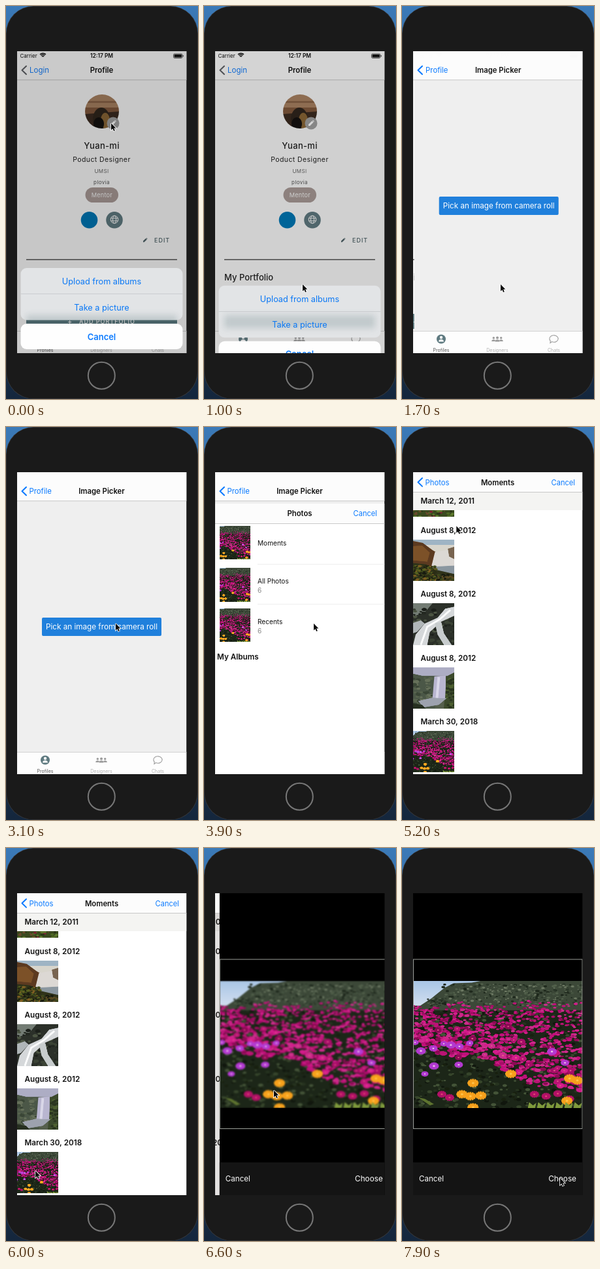
An HTML page with a canvas that plays this animation: 294 px wide and 600 px high, repeating every 8000 ms.

```html
<!DOCTYPE html>
<html lang="en">
<head>
<meta charset="utf-8">
<title>Profile photo picker</title>
<style>
html, body { margin: 0; width: 100%; height: 100%; overflow: hidden; background: #1a1a1a; }
canvas { display: block; width: 294px; height: 600px; }
</style>
</head>
<body>
<canvas id="stage"></canvas>
<script>
const W = 294, H = 600, LOOP = 8000;
const SX = 17, SY = 69, SW = 259.5, SH = 461, MID = 146.5;
const BLUE = '#0a7aff', TEAL = '#5f7a80';
const canvas = document.getElementById('stage');
const dpr = window.devicePixelRatio || 1;
canvas.width = W * dpr;
canvas.height = H * dpr;
const c = canvas.getContext('2d');

const lerp = (a, b, p) => a + (b - a) * p;
const ease = (t, start, len) => {
  const u = Math.min(1, Math.max(0, (t - start) / len));
  return u * u * (3 - 2 * u);
};
function seeded(s) {
  return () => (s = (s * 16807) % 2147483647) / 2147483647;
}

// ---- drawing helpers
function box(x, y, w, h, color, r = 0, g = c) {
  g.fillStyle = color;
  g.beginPath();
  g.roundRect(x, y, w, h, r);
  g.fill();
}
function oval(x, y, rx, ry, color, g = c) {
  g.fillStyle = color;
  g.beginPath();
  g.ellipse(x, y, rx, ry, 0, 0, 7);
  g.fill();
}
function poly(points, color, g = c) {
  g.fillStyle = color;
  g.beginPath();
  for (let i = 0; i < points.length; i += 2) g.lineTo(points[i], points[i + 1]);
  g.closePath();
  g.fill();
}
function stroke(points, color, width, g = c) {
  g.strokeStyle = color;
  g.lineWidth = width;
  g.beginPath();
  for (let i = 0; i < points.length; i += 2) g.lineTo(points[i], points[i + 1]);
  g.stroke();
}
function text(s, x, y, size, color, weight = 400, align = 'left', gap = 0) {
  c.font = `${weight} ${size}px Inter, "Open Sans", sans-serif`;
  c.letterSpacing = gap + 'px';
  c.textAlign = align;
  c.fillStyle = color;
  c.fillText(s, x, y);
}
function layer(fn, alpha = 1, dx = 0, dy = 0) {
  c.save();
  c.globalAlpha *= alpha;
  c.translate(dx, dy);
  fn();
  c.restore();
}

// ---- pictures
function picture(w, h, paint) {
  const p = document.createElement('canvas');
  p.width = w * 2;
  p.height = h * 2;
  const g = p.getContext('2d');
  g.scale(2, 2);
  paint(g);
  return p;
}
function dabs(g, n, seed, area, colors, size) {
  const rnd = seeded(seed), [x, y, w, h] = area;
  for (let i = 0; i < n; i++) {
    const r = size * (0.5 + rnd());
    oval(x + rnd() * w, y + rnd() * h, r, r * 0.6, colors[Math.floor(rnd() * colors.length)], g);
  }
}
function bloom(g, x, y, r, color, core) {
  for (let i = 0; i < 12; i++) {
    const a = i * Math.PI / 6;
    stroke([x, y, x + Math.cos(a) * r, y + Math.sin(a) * r * 0.75], color, r * 0.36, g);
  }
  oval(x, y, r * 0.22, r * 0.18, core, g);
}

const GREENS = ['#26331f', '#18200f', '#36452b', '#445438', '#11170e'];
const PINKS = ['#c0107a', '#a80d69', '#d41c8c', '#8d0a55', '#b91474', '#cc2b8b'];

const flowers = picture(260, 194, g => {
  box(0, 0, 260, 194, '#1c2618', 0, g);
  const sky = g.createLinearGradient(0, 0, 0, 40);
  sky.addColorStop(0, '#a9c6e6');
  sky.addColorStop(1, '#d3dff0');
  box(0, 0, 260, 38, sky, 0, g);
  poly([8, 40, 28, 27, 48, 11, 62, 4, 90, 3, 106, 0, 260, 0, 260, 45, 0, 45], '#3c4838', g);
  dabs(g, 420, 5, [46, 5, 216, 34], ['#2c382a', '#52604b', '#6c7862', '#1e281c', '#465441'], 1.9);
  dabs(g, 60, 6, [22, 27, 30, 12], ['#2c382a', '#52604b', '#1e281c'], 1.8);
  dabs(g, 650, 11, [0, 44, 260, 150], GREENS, 2.8);
  const rnd = seeded(77);
  for (let i = 0; i < 1150; i++) {
    const x = rnd() * 262, v = rnd();
    const top = 37 + 5 * Math.sin(x / 17) - x * 0.025;
    const low = 90 + x * 0.34 + 8 * Math.sin(x / 23);
    const y = lerp(top, low, v);
    if (Math.sin(x * 0.07 + y * 0.23) + Math.sin(y * 0.34 - x * 0.045) > 1.25) continue;
    const r = 1.6 + v * 3 * rnd() + rnd() * 1.6;
    oval(x, y, r, r * 0.55, PINKS[Math.floor(rnd() * 6)], g);
  }
  for (let i = 0; i < 38; i++) {
    const x = rnd() * 260, y = 65 + rnd() * (35 + x * 0.27);
    bloom(g, x, y, 4 + rnd() * 3, PINKS[Math.floor(rnd() * 6)], '#e05a86');
  }
  [44, 173, 56, 178, 186, 173, 204, 176, 222, 172, 240, 180].forEach((v, i, a) => {
    if (i % 2 === 0) bloom(g, v, a[i + 1], 7, '#b31167', '#dc4a70');
  });
  [3, 94, 12, 107, 31, 103, 47, 96, 58, 98, 71, 100, 87, 95, 32, 130, 70, 128, 18, 142, 213, 108, 233, 125]
    .forEach((v, i, a) => {
      if (i % 2 === 0) bloom(g, v, a[i + 1], 5.5 + i % 3, '#b43ad2', '#e9c0e6');
    });
  [92, 156, 75, 173, 88, 176, 104, 175, 150, 142, 240, 149, 252, 152, 236, 183, 92, 193]
    .forEach((v, i, a) => {
      if (i % 2 === 0) bloom(g, v, a[i + 1], 8.5, '#f7a11c', '#ffc24a');
    });
  for (let i = 0; i < 6; i++) {
    const x = 176 + i * 14;
    poly([x, 194, x + 2, 185, x + 8, 190, x + 13, 186, x + 11, 194], '#7f9a3c', g);
  }
  poly([8, 178, 18, 180, 32, 188, 26, 190], '#5e742f', g);
});

const meadow = picture(64, 64, g => {
  box(0, 0, 64, 64, '#3a4a1f', 0, g);
  dabs(g, 160, 21, [0, 0, 64, 64], ['#4f6a24', '#2a3517', '#7d2333', '#6b4a2c', '#5c7a2c'], 2.2);
});
const sunsetFalls = picture(64, 64, g => {
  box(0, 0, 64, 64, '#9fb4c4', 0, g);
  box(0, 8, 64, 14, '#d8d5cc', 0, g);
  poly([0, 2, 15, 5, 30, 16, 40, 22, 40, 46, 0, 50], '#5c3a20', g);
  poly([0, 10, 14, 9, 26, 20, 22, 34, 0, 32], '#7c5128', g);
  poly([34, 19, 64, 14, 64, 46, 28, 43], '#dcd8d4', g);
  poly([54, 14, 64, 11, 64, 30, 56, 26], '#786450', g);
  poly([26, 42, 64, 40, 64, 54, 30, 54], '#8b97a0', g);
  poly([0, 36, 20, 38, 38, 47, 64, 53, 64, 64, 0, 64], '#30331a', g);
  dabs(g, 130, 31, [0, 40, 37, 24], ['#56601f', '#2a2c14', '#806022', '#3e4a1c', '#181b10'], 2);
  dabs(g, 40, 33, [36, 54, 28, 10], ['#3e4a1c', '#181b10', '#5a4a22'], 2);
});
const streamFalls = picture(64, 64, g => {
  box(0, 0, 64, 64, '#2b3029', 0, g);
  poly([0, 0, 30, 0, 18, 14, 0, 20], '#737c74', g);
  dabs(g, 80, 41, [0, 8, 64, 56], ['#1b1f1a', '#3b4335', '#4b5442', '#232821'], 3);
  poly([64, 5, 50, 8, 38, 22, 18, 31, 4, 48, 0, 64, 22, 64, 26, 44, 44, 28, 64, 19], '#d5d8da', g);
  poly([0, 30, 12, 26, 18, 31, 6, 44, 0, 46], '#b0b6b8', g);
  poly([34, 30, 44, 29, 48, 46, 60, 64, 48, 64, 38, 48], '#c7cccd', g);
  stroke([58, 10, 42, 24, 22, 36, 12, 64], '#fbfcfc', 3, g);
});
const canyonFalls = picture(64, 64, g => {
  box(0, 0, 64, 64, '#555f4c', 0, g);
  box(0, 0, 64, 13, '#adadc4', 0, g);
  poly([0, 10, 18, 14, 34, 13, 34, 64, 0, 64], '#4b5747', g);
  poly([50, 15, 64, 8, 64, 64, 48, 64], '#3c4a2c', g);
  dabs(g, 60, 51, [0, 16, 30, 42], ['#66705a', '#3a4636', '#58644e'], 3);
  dabs(g, 40, 53, [51, 18, 13, 46], ['#4d6030', '#2a351f'], 2.5);
  poly([33, 14, 51, 13, 50, 48, 30, 50], '#b9b6d0', g);
  stroke([40, 15, 37, 48], '#d9d7e8', 4, g);
  poly([8, 52, 30, 47, 52, 48, 40, 58, 16, 62], '#9da2ae', g);
  poly([0, 56, 14, 58, 20, 64, 0, 64], '#262f20', g);
});
const avatar = picture(52, 52, g => {
  box(0, 0, 52, 52, '#a98262', 0, g);
  box(0, 10, 52, 3, '#8a6448', 0, g);
  box(0, 20, 52, 12, '#80583c', 0, g);
  poly([0, 30, 52, 26, 52, 52, 0, 52], '#3b2b20', g);
  oval(25, 38, 13, 18, '#30251c', g);
  oval(31, 40, 7, 12, '#8a6636', g);
  oval(21, 45, 8, 10, '#14110f', g);
});

// ---- shared parts
function chevron(color, y) {
  c.lineCap = 'round';
  c.lineJoin = 'round';
  stroke([31, y - 6.3, 24.5, y, 31, y + 6.3], color, 2);
}
function navBar(h, y, from, to, p, tint = BLUE) {
  box(SX, SY, SW, h, '#fcfcfc');
  box(SX, SY + h - 0.5, SW, 0.7, '#b8b8b8');
  const base = y + 4.2;
  if (from.back) layer(() => text(from.back, 36, base, 11.5, '#157efb'), 1 - p);
  layer(() => chevron(tint, y), from.back ? 1 : p);
  c.font = '600 11.3px Inter, sans-serif';
  c.letterSpacing = '0px';
  const x = lerp(MID - c.measureText(from.title).width / 2, 35.5, p);
  layer(() => text(from.title, x, base, 11.3, '#111', 600), 1 - p);
  layer(() => text(from.title, x, base, 11.3, BLUE), p);
  if (to) layer(() => text(to.title, MID + 115 * (1 - p), base, 11.3, '#111', 600, 'center'), p);
}
function pencil(x, y, s, color) {
  poly([x - s, y + s, x - s, y + s * 0.45, x + s * 0.35, y - s * 0.9, x + s * 0.9, y - s * 0.35, x - s * 0.45, y + s], color);
  poly([x + s * 0.5, y - s, x + s * 0.75, y - s * 1.2, x + s * 1.2, y - s * 0.75, x + s, y - s * 0.5], color);
}
function person(x, y, s, color) {
  oval(x, y - s, s, s, color);
  c.beginPath();
  c.ellipse(x, y + s * 2, s * 1.8, s * 1.6, 0, Math.PI, 0);
  c.fill();
}
function tabBar() {
  box(SX, 496, SW, 34, '#fdfdfd');
  box(SX, 496, SW, 0.7, '#c4c4c4');
  oval(60, 508.5, 7, 7, TEAL);
  person(60, 508.2, 2.2, '#fdfdfd');
  const gray = '#9c9c9c';
  person(140.3, 508.5, 1.7, gray);
  person(151.7, 508.5, 1.7, gray);
  person(146, 508.5, 2.5, '#fdfdfd');
  person(146, 508.5, 2, gray);
  c.strokeStyle = gray;
  c.lineWidth = 1.1;
  c.beginPath();
  c.ellipse(232.5, 508, 6.6, 5.2, 0, 2.5, 8.35);
  c.lineTo(227, 514.5);
  c.closePath();
  c.stroke();
  text('Profiles', 60, 528, 7, '#555', 400, 'center');
  text('Designers', 146, 528, 7, '#b0b0b0', 400, 'center');
  text('Chats', 232.5, 528, 7, '#b0b0b0', 400, 'center');
}
function statusBar() {
  text('Carrier', 21.5, 79, 8, '#111');
  text('12:17 PM', MID, 79, 8.4, '#111', 600, 'center');
  c.strokeStyle = '#111';
  c.lineWidth = 1.4;
  for (const r of [2.4, 4.6, 6.8]) {
    c.beginPath();
    c.arc(56.5, 79, r, -2.3, -0.85);
    c.stroke();
  }
  c.lineWidth = 0.7;
  c.beginPath();
  c.roundRect(256.5, 73, 13.5, 6.5, 1.8);
  c.stroke();
  box(257.5, 74, 11.5, 4.5, '#111', 1);
  box(270.5, 75, 1, 2.5, '#111');
}

// ---- screens
function profile() {
  box(SX, SY, SW, SH, '#f8f8f8');
  layer(() => {
    c.beginPath();
    c.arc(147, 161, 26, 0, 7);
    c.clip();
    c.drawImage(avatar, 121, 135, 52, 52);
  });
  oval(164, 179, 9.5, 9.5, '#a0a0a0');
  pencil(164, 179, 4, '#fff');
  text('Yuan-mi', MID, 218, 13, '#222', 500, 'center', 0.3);
  text('Poduct Designer', MID, 238, 10.5, '#222', 400, 'center', 0.4);
  text('UMSI', MID, 255, 8, '#666', 400, 'center', 0.4);
  text('plovia', MID, 271.5, 8, '#555', 400, 'center', 0.4);
  box(121.5, 277, 50.5, 23, '#a89a96', 11.5);
  text('Mentor', MID + 0.3, 292, 9.2, '#f4f4f4', 400, 'center', 0.2);
  oval(127.5, 326.8, 12.8, 12.8, '#0077b5');
  oval(166, 326.8, 12.8, 12.8, TEAL);
  c.strokeStyle = '#f4f4f4';
  c.lineWidth = 1;
  for (const rx of [5.8, 2.6]) {
    c.beginPath();
    c.ellipse(166, 326, rx, 5.8, 0, 0, 7);
    c.stroke();
  }
  stroke([160.8, 324, 171.2, 324], '#f4f4f4', 1);
  stroke([160.8, 328, 171.2, 328], '#f4f4f4', 1);
  pencil(213, 357.5, 3, '#4c6166');
  text('EDIT', 227, 361, 9, '#4c6166', 500, 'left', 1);
  box(31, 386.5, 231, 1.4, '#555');
  text('My Portfolio', 31, 418.8, 13, '#222', 500);
  box(31, 470, 231, 23, '#5a7a80', 2);
  text('+', 94, 485.5, 11, '#f4f4f4', 500);
  text('ADD PORTFOLIO', 112, 485.3, 9, '#f4f4f4', 500, 'left', 1);
}
function sheet(dy) {
  layer(() => {
    c.beginPath();
    c.roundRect(22.5, 400, 248, 79.5, 9);
    c.clip();
    box(22, 400, 249, 80, '#e2e4e6');
    c.filter = 'blur(5px)';
    box(31, 472 - dy, 231, 20, 'rgba(80,110,116,.22)');
    c.filter = 'none';
    box(22, 439.3, 249, 0.7, '#c3c6c8');
    text('Upload from albums', MID, 425, 12.7, '#0a78f5', 400, 'center');
    text('Take a picture', MID, 464.5, 12.7, '#0a78f5', 400, 'center');
  }, 1, 0, dy);
  layer(() => {
    box(22.5, 485, 248, 39, '#fefefe', 9);
    text('Cancel', MID, 509.5, 12.9, BLUE, 600, 'center');
  }, 1, 0, dy);
}
function picker() {
  box(SX, SY, SW, SH, '#efefef');
  box(55, 291, 183, 28, '#2080dc', 2);
  text('Pick an image from camera roll', MID, 309.2, 11.7, '#fff', 400, 'center');
}
function square(y) {
  c.drawImage(flowers, 66 * 2, 0, 388, 388, 24, y, 47, 51.5);
}
function albums(p) {
  box(SX, 99, SW, 431, '#fff');
  if (p > 0) box(SX, 99, SW, 62, '#c6c6c6');
  [103, 167.5, 229].forEach(square);
  text('Moments', 82, 132.7, 10.1, '#111');
  ['All Photos', 'Recents'].forEach((s, i) => {
    const y = 191.5 + i * 61.5;
    text(s, 82, y, 10.1, '#111');
    text('6', 82, y + 14, 10.1, '#8a8a8a');
    if (!p) box(82, 161 + i * 61.5, SW, 0.6, '#ddd');
  });
  text('My Albums', 20, 307, 11.7, '#111', 600);
}
function moments() {
  box(SX, 99, SW, 431, '#fff');
  c.drawImage(meadow, SX, 74, 63, 63);
  box(SX, 99, SW, 28, '#f4f4f2');
  text('March 12, 2011', 28.5, 117.3, 11.7, '#111', 600);
  [sunsetFalls, streamFalls, canyonFalls].forEach((img, i) => {
    const y = 172 + i * 97.4;
    text('August 8, 2012', 28.5, y - 10, 11.7, '#111', 600);
    c.drawImage(img, SX, y, 63, 63.3);
  });
  text('March 30, 2018', 28.5, 454.3, 11.7, '#111', 600);
  c.drawImage(flowers, 70, 0, 388, 388, SX, 464, 63, 63.3);
}
function crop(blurred) {
  box(SX, SY, SW, SH, '#000');
  layer(() => {
    c.beginPath();
    c.rect(SX, 202.5, SW, 194.5);
    c.clip();
    if (blurred) c.filter = 'blur(1.3px)';
    c.drawImage(flowers, SX, 202.5, SW, 194.5);
  });
  c.strokeStyle = '#9a9e98';
  c.lineWidth = 1;
  c.strokeRect(17.5, 170, 258.5, 258.5);
  box(SX, 480, SW, 50, '#141414');
  text('Cancel', 26, 509, 11.6, '#fff');
  text('Choose', 267, 509, 11.8, '#fff', 400, 'right');
}

// ---- timeline
function profileFlow(t) {
  const away = ease(t, 900, 350), p = ease(t, 1300, 420);
  layer(profile, 1, -0.3 * SW * p);
  if (p > 0) layer(picker, 1, SW * (1 - p));
  navBar(44, 98, { title: 'Profile', back: 'Login' }, { title: 'Image Picker' }, p, away < 1 ? '#5f6266' : BLUE);
  layer(statusBar, 1 - p);
  tabBar();
  if (away < 1) {
    box(SX, SY, SW, SH, `rgba(0,0,0,${0.2 * (1 - away)})`);
    sheet(135 * away);
  }
}
function photoFlow(t) {
  const p = ease(t, 4700, 422), q = ease(t, 6200, 443);
  layer(() => {
    layer(() => albums(p), 1, -0.3 * SW * p);
    if (p > 0) {
      box(SX, 99, SW, 431, `rgba(0,0,0,${0.12 * p})`);
      layer(moments, 1, SW * (1 - p));
    }
    if (q > 0) box(SX, 99, SW, 431, `rgba(20,0,0,${0.12 * q})`);
    navBar(30.5, 84.3, { title: 'Photos' }, { title: 'Moments' }, p);
    const fade = c.createLinearGradient(210, 0, 226, 0);
    fade.addColorStop(0, 'rgba(252,252,252,0)');
    fade.addColorStop(1, '#fcfcfc');
    box(210, 71, 66, 27, fade);
    text('Cancel', 265, 88.5, 11.1, BLUE, 400, 'right');
  }, 1, -0.3 * SW * q);
  if (q > 0) layer(() => crop(t < 6800), 1, SW * (1 - q));
}

const PATH = [
  [0, 161, 179], [100, 161, 179], [800, 150.5, 424], [1000, 151, 425], [1900, 151, 425],
  [2700, 168, 300], [4000, 168, 300], [4600, 85, 136], [5100, 85, 136], [5900, 45, 493],
  [6200, 45, 493], [6600, 107, 370], [6900, 112, 376], [7700, 242, 504], [8000, 242, 504]
];
function cursor(t) {
  const i = PATH.findIndex((k, n) => n && t < k[0]);
  const [t0, x0, y0] = PATH[i - 1], [t1, x1, y1] = PATH[i];
  const p = ease(t, t0, t1 - t0);
  layer(() => {
    const arrow = [0, 0, 0, 10.5, 2.4, 8.3, 4.1, 12, 5.8, 11.2, 4.2, 7.6, 7.4, 7.4, 0, 0];
    stroke(arrow, '#fff', 1.6);
    poly(arrow, '#0a0a0a');
  }, 1, lerp(x0, x1, p), lerp(y0, y1, p));
}
function phone() {
  const bg = c.createLinearGradient(0, 0, 0, H);
  bg.addColorStop(0, '#3b7ab8');
  bg.addColorStop(0.5, '#1f4a78');
  bg.addColorStop(1, '#14263c');
  box(0, 0, W, H, bg);
  box(0, 0, W, H, '#3a3c3f', 42);
  box(0.7, 0.7, W - 1.4, H - 1.4, '#1a1a1a', 41.5);
  c.strokeStyle = '#777';
  c.lineWidth = 2;
  c.beginPath();
  c.arc(146.3, 564.3, 20.5, 0, 7);
  c.stroke();
}
function draw(t) {
  c.setTransform(dpr, 0, 0, dpr, 0, 0);
  phone();
  c.save();
  c.beginPath();
  c.rect(SX, SY, SW, SH);
  c.clip();
  const up = ease(t, 3500, 500);
  if (up < 1) profileFlow(t);
  if (up > 0) layer(() => photoFlow(t), 1, 0, SH * (1 - up));
  c.restore();
  cursor(t);
}
function tick(now) {
  draw(Math.floor((now % LOOP) / 100) * 100);
  requestAnimationFrame(tick);
}
draw(0);
requestAnimationFrame(tick);
</script>
</body>
</html>
```
